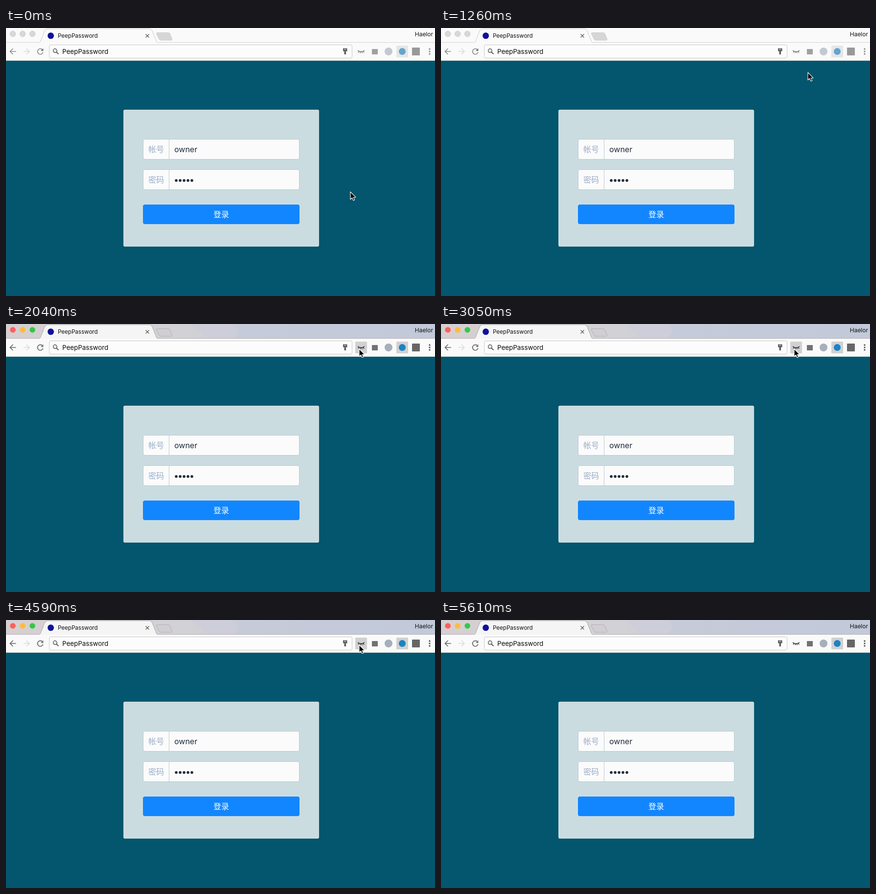
Animation of 877 by 548 pixels, one loop 5710 ms. Source, as an HTML page:

```html
<!DOCTYPE html>
<html lang="zh">
<head>
<meta charset="utf-8">
<title>PeepPassword</title>
<style>
  html, body { margin: 0; width: 100%; height: 100%; overflow: hidden; background: #03566d; }
  svg { display: block; width: 100%; height: 100%; }
  text { font-family: Inter, "Noto Sans CJK SC", "Noto Sans CJK", sans-serif; }
  .line { fill: none; stroke-linecap: butt; }
  .label { font: 16px "Noto Sans CJK SC", "Noto Sans CJK", sans-serif; fill: #9aadc9; }
  .value { font-size: 16px; fill: #1f2d3d; }
</style>
</head>
<body>
<svg viewBox="0 0 877 548" preserveAspectRatio="none">
  <defs>
    <linearGradient id="sky">
      <stop offset="0" stop-color="#d6cfd1"/>
      <stop offset=".43" stop-color="#d2d1d5"/>
      <stop offset=".55" stop-color="#c6cbd9"/>
      <stop offset="1" stop-color="#c2c9d9"/>
    </linearGradient>
  </defs>

  <!-- tab strip -->
  <rect width="877" height="67" fill="#fafafa"/>
  <g id="strip">
    <rect width="877" height="30" fill="url(#sky)"/>
    <path d="M378 0H466Q476 14 470 21Q466 29 455 30H414Q405 24 400 16Q387 11 378 0Z" fill="#cdced9"/>
  </g>
  <path id="edge" class="line" d="M0 29.5H68M310 29.5H877"/>
  <path id="tab" d="M68 30Q70 29 71 26L79 6Q81 1.500 85 1.500H293Q297 1.500 299 6L307 26Q308 29 310 30"/>
  <path id="plus" d="M309.500 9.500H331Q334 9.500 335 11.500L339.500 22.500Q340.500 25 338 25H317Q314 25 313 23L307.500 12Q306.500 9.500 309.500 9.500Z"/>
  <g id="lights" stroke-width=".8"></g>
  <circle cx="91.500" cy="15.800" r="6.500" fill="#10109a"/>
  <text x="106" y="20" font-size="11.600" fill="#111">PeepPassword</text>
  <path class="line" d="M285.500 12.500l7 7m0-7l-7 7" stroke="#5c5c5c" stroke-width="1.400"/>
  <text x="873" y="17" font-size="12" text-anchor="end" fill="#111">Haelor</text>

  <!-- toolbar -->
  <g class="line" stroke-width="1.700">
    <g id="nav">
      <path d="M20.500 48H8.500M14.300 42L8.300 48L14.300 54"/>
      <path d="M74.500 44.300A5.700 5.700 0 1 0 75.700 49.500"/>
      <path d="M76.300 41.500V47H70.800Z" stroke="none" fill="#777"/>
    </g>
    <path d="M35.500 48H47.500M41.700 42L47.700 48L41.700 54" stroke="#dcdcdc"/>
  </g>
  <rect x="88.500" y="34.500" width="619" height="27" rx="3.500" fill="#fcfcfc" stroke="#c9c9c9"/>
  <circle cx="100.300" cy="46.300" r="3.700" class="line" stroke="#555" stroke-width="1.500"/>
  <path d="M103 49L107.300 53.300" stroke="#555" stroke-width="1.900"/>
  <text x="115" y="53.300" font-size="13.400" fill="#0c0c0c">PeepPassword</text>
  <path d="M689 41.500H697.500V47.500H695V54H691.500V47.500H689Z" fill="#5d5d5d"/>
  <path d="M691.500 43.700H695" stroke="#fff"/>
  <rect id="hover" x="714" y="36" width="24" height="24" rx="1.500"/>
  <rect id="tile" x="798" y="36" width="24" height="24" rx="1.500"/>
  <g id="icons">
    <g id="shut" class="line" stroke="#1c1c1c" stroke-width="1.300">
      <path d="M719 45.700Q726 51.300 733 45.700M721.700 47.700L720 50.300M724.500 48.700L724 51.500M727.500 48.700L728 51.500M730.300 47.700L732 50.300"/>
    </g>
    <g id="open">
      <path d="M718.500 48Q726 39.500 733.500 48Q726 56 718.500 48Z" fill="none" stroke="#333" stroke-width="1.400"/>
      <circle cx="726" cy="47.700" r="3.700" fill="#222"/>
      <circle cx="724.800" cy="46.400" r="1.100" fill="#ddd"/>
    </g>
    <rect x="748" y="43" width="12" height="11" fill="#727272"/>
    <circle cx="782" cy="48" r="8" fill="#a6afba"/>
    <circle cx="810" cy="48" r="7" fill="#1c83c4"/>
    <rect x="830" y="40" width="16" height="16" rx="1" fill="#666"/>
    <g fill="#555">
      <circle cx="866" cy="43" r="1.700"/><circle cx="866" cy="48" r="1.700"/><circle cx="866" cy="53" r="1.700"/>
    </g>
  </g>
  <path d="M0 66.500H877" stroke="#d3d8da"/>

  <!-- page -->
  <rect y="67" width="877" height="481" fill="#03566d"/>
  <rect x="240" y="167" width="400" height="280" rx="3" fill="#cbdce0"/>
  <g fill="#fbfbfb" stroke="#b9c9d6">
    <rect x="280.500" y="227.500" width="319" height="41" rx="3.500"/>
    <rect x="280.500" y="289.500" width="319" height="41" rx="3.500"/>
    <path d="M333.500 228V268M333.500 290V330"/>
  </g>
  <text class="label" x="291" y="253.500">帐号</text>
  <text class="label" x="291" y="315.500">密码</text>
  <text class="value" x="344" y="254">owner</text>
  <text class="value" x="344" y="316" id="plain">owner</text>
  <g id="dots" fill="#1f2d3d"></g>
  <rect x="280" y="361" width="320" height="40" rx="4" fill="#1186ff"/>
  <text x="440" y="387" text-anchor="middle" style="font:16px 'Noto Sans CJK SC','Noto Sans CJK',sans-serif" fill="#fff">登录</text>

  <path id="cursor" d="M0 0V15.500L3.500 12.200L6.100 17.800L8.700 16.600L6.200 11.200H11Z" fill="#000" stroke="#fff" stroke-width="1.100" stroke-linejoin="round"/>
</svg>
<script>
const LOOP = 5710;
const $ = id => document.getElementById(id);
const set = (id, attrs) => {
  for (const key in attrs) $(id).setAttribute(key, attrs[key]);
};
const show = (id, on) => set(id, { visibility: on ? "visible" : "hidden" });

function addCircle(parent, cx, cy, r) {
  const c = document.createElementNS("http://www.w3.org/2000/svg", "circle");
  parent.append(c);
  for (const [key, v] of Object.entries({ cx, cy, r })) c.setAttribute(key, v);
  return c;
}

const lights = [14, 34, 54].map(x => addCircle($("lights"), x, 12, 5.8));
const lightColors = ["#fc605c", "#fdbc40", "#34c84a"];
for (let i = 0; i < 5; i++) addCircle($("dots"), 348 + i * 8, 311.7, 2.8);

// Pointer moves: first step, last step, step count, destination
const home = [704, 335];
const moves = [
  [660, 800, 3, 708, 208],
  [1030, 1260, 5, 750, 91],
  [1440, 1840, 8, 722, 51],
  [4740, 4940, 4, 863, 457],
  [5000, 5310, 5, 853, 542],
  [5370, 5420, 2, 852, 550]
];

function pointer(t) {
  let [x, y] = home;
  for (const [start, end, steps, toX, toY] of moves) {
    if (t < start) break;
    const done = Math.floor((t - start) / (end - start) * (steps - 1)) + 1;
    const p = Math.min(1, done / steps);
    const k = p * p * (3 - 2 * p);
    x += (toX - x) * k;
    y += (toY - y) * k;
  }
  return [x, y];
}

function draw(t) {
  const active = t >= 2040;
  const peek = (t >= 2100 && t < 3000) || (t >= 3850 && t < 4410);
  const over = t >= 1780 && t < 4740;

  show("strip", active);
  set("edge", { stroke: active ? "#b3b1b5" : "#d2d2d2" });
  set("tab", { fill: active ? "#f5f5f5" : "#fafafa", stroke: active ? "#aaa8ab" : "#cbcbcb" });
  set("plus", { fill: active ? "#d0ced2" : "#d6d6d6", stroke: active ? "#b2b0b4" : "#cecece" });
  lights.forEach((c, i) => {
    c.setAttribute("fill", active ? lightColors[i] : "#d8d8d8");
    c.setAttribute("stroke", active ? "none" : "#c6c6c6");
  });
  set("nav", { stroke: active ? "#666" : "#8d8d8d" });
  set("icons", { opacity: active ? 1 : 0.65 });
  set("tile", { fill: active ? "#d1d1d1" : "#e6e6e6" });
  set("hover", { fill: active ? "#d1d1d1" : "#ebebeb" });
  show("hover", over);

  show("open", peek);
  show("shut", !peek);
  show("plain", peek);
  show("dots", !peek);
  set("cursor", { transform: `translate(${pointer(t)})` });
}

const began = performance.now();
function tick() {
  draw((performance.now() - began) % LOOP);
  requestAnimationFrame(tick);
}
tick();
</script>
</body>
</html>
```
